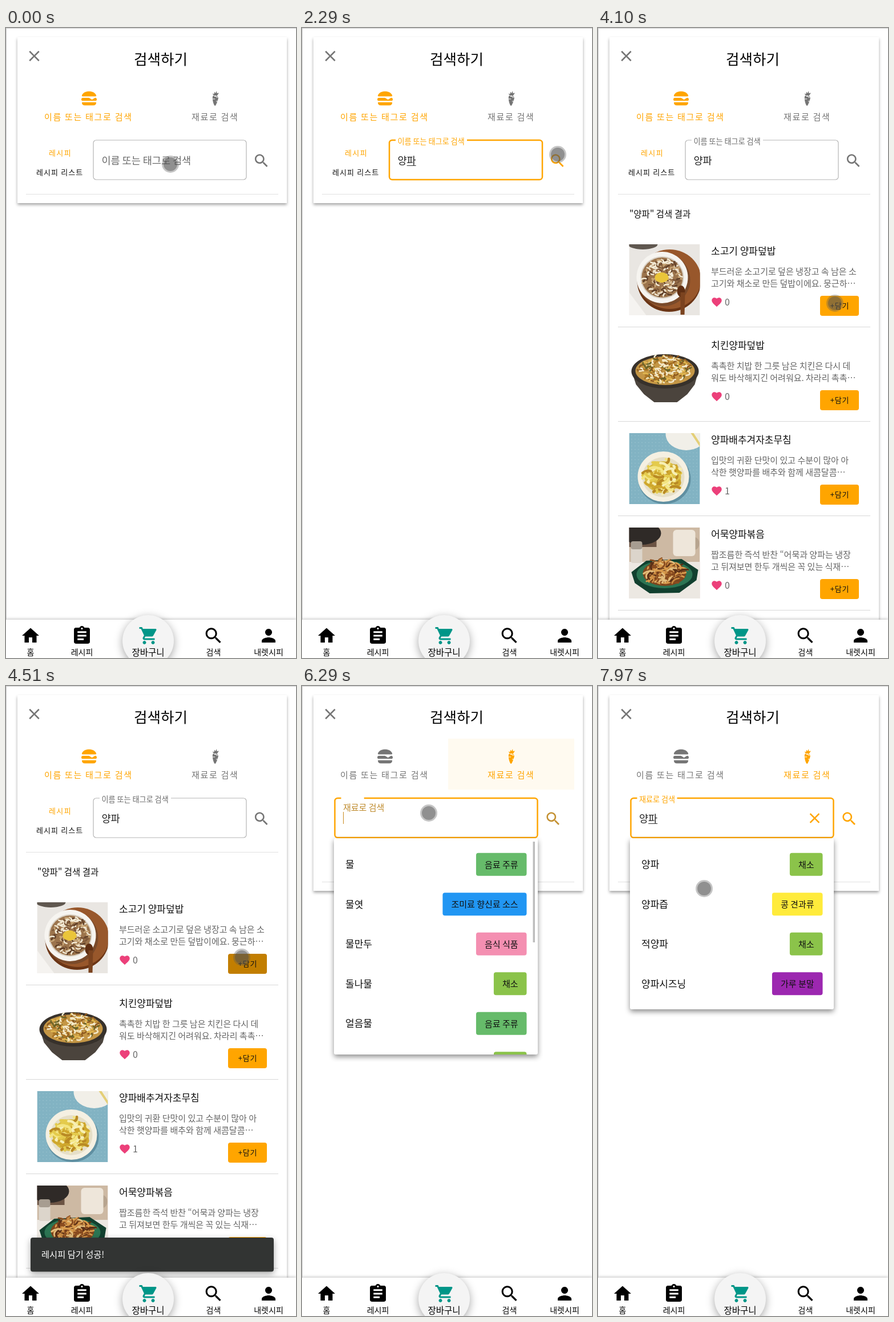
These frames come from a looping animation (508 by 1101 pixels, 8000 ms). An HTML page with a canvas:

```html
<!DOCTYPE html>
<html lang="ko">
<head>
<meta charset="utf-8">
<style>
html, body { margin: 0; width: 100%; height: 100%; overflow: hidden; background: #fff; }
canvas { display: block; }
</style>
</head>
<body>
<canvas id="stage" width="508" height="1101"></canvas>
<script>
const ctx = document.getElementById('stage').getContext('2d');
const LOOP = 8000, ORANGE = [255, 165, 0], GREY = [117, 117, 117], TAU = Math.PI * 2;
const OPEN_RESULTS = 2570, SWITCH_TAB = 5500, FOCUS_2 = 6234;

const ICONS = {
  close: 'M19 6.41L17.59 5 12 10.59 6.41 5 5 6.41 10.59 12 5 17.59 6.41 19 12 13.41 17.59 19 19 17.59 13.41 12z',
  search: 'M15.5 14h-.79l-.28-.27C15.41 12.59 16 11.11 16 9.5 16 5.91 13.09 3 9.5 3S3 5.91 3 9.5 5.91 16 9.5 16c1.61 0 3.09-.59 4.23-1.57l.27.28v.79l5 4.99L20.49 19l-4.99-5zm-6 0C7.01 14 5 11.99 5 9.5S7.01 5 9.5 5 14 7.01 14 9.5 11.99 14 9.5 14z',
  heart: 'M12 21.35l-1.45-1.32C5.4 15.36 2 12.28 2 8.5 2 5.42 4.42 3 7.5 3c1.74 0 3.41.81 4.5 2.09C13.09 3.81 14.76 3 16.5 3 19.58 3 22 5.42 22 8.5c0 3.78-3.4 6.86-8.55 11.54L12 21.35z',
  home: 'M10 20v-6h4v6h5v-8h3L12 3 2 12h3v8z',
  recipe: 'M19 3h-4.18C14.4 1.84 13.3 1 12 1c-1.3 0-2.4.84-2.82 2H5c-1.1 0-2 .9-2 2v14c0 1.1.9 2 2 2h14c1.1 0 2-.9 2-2V5c0-1.1-.9-2-2-2zm-7 0c.55 0 1 .45 1 1s-.45 1-1 1-1-.45-1-1 .45-1 1-1zm2 14H7v-2h7v2zm3-4H7v-2h10v2zm0-4H7V7h10v2z',
  cart: 'M7 18c-1.1 0-1.99.9-1.99 2S5.9 22 7 22s2-.9 2-2-.9-2-2-2zM1 2v2h2l3.6 7.59-1.35 2.45c-.16.28-.25.61-.25.96 0 1.1.9 2 2 2h12v-2H7.42c-.14 0-.25-.11-.25-.25l.03-.12.9-1.63h7.45c.75 0 1.41-.41 1.75-1.03l3.58-6.49c.08-.14.12-.31.12-.48 0-.55-.45-1-1-1H5.21l-.94-2H1zm16 16c-1.1 0-1.99.9-1.99 2s.89 2 1.99 2 2-.9 2-2-.9-2-2-2z',
  person: 'M12 12c2.21 0 4-1.79 4-4s-1.79-4-4-4-4 1.79-4 4 1.79 4 4 4zm0 2c-2.67 0-8 1.34-8 4v2h16v-2c0-2.66-5.33-4-8-4z',
  burger: 'M1 8.6C-.2 8.6-.6 7.7-.1 6.7 1.6 2.5 6 0 12 0s10.4 2.5 12.1 6.7c.5 1 .1 1.9-1.1 1.9zM1.5 11H12l5 3.2L22 11h.5a2.6 2.6 0 0 1 0 5.2h-21a2.6 2.6 0 0 1 0-5.2zM.6 18.6h22.8q.8 0 .8.8a5 5 0 0 1-5 4.6H4.8a5 5 0 0 1-5-4.6q0-.8.8-.8z',
  carrot: 'M7 9C6 14 9 24.5 11 25S16.5 14 17 11 8 5 7 9zM10.5 9L6.5 3.5 9.5 4.5 10 .5 12 3 14-1 14.5 3 18 2.5 13.5 9z'
};
for (const name in ICONS) ICONS[name] = new Path2D(ICONS[name]);

const RECIPES = [
  ['소고기 양파덮밥', '부드러운 소고기로 덮은 냉장고 속 남은 소', '고기와 채소로 만든 덮밥이에요. 뭉근하⋯', 0],
  ['치킨양파덮밥', '촉촉한 치밥 한 그릇 남은 치킨은 다시 데', '워도 바삭해지긴 어려워요. 차라리 촉촉⋯', 0],
  ['양파배추겨자초무침', '입맛의 귀환 단맛이 있고 수분이 많아 아', '삭한 햇양파를 배추와 함께 새콤달콤⋯', 1],
  ['어묵양파볶음', '짭조름한 즉석 반찬 “어묵과 양파는 냉장', '고 뒤져보면 한두 개씩은 꼭 있는 식재⋯', 0]
];
const DRINK = ['음료 주류', '#66bb6a'], VEG = ['채소', '#8bc34a'];
const WATER_LIST = [['물', ...DRINK], ['물엿', '조미료 향신료 소스', '#2196f3'], ['물만두', '음식 식품', '#f48fb1'],
  ['돌나물', ...VEG], ['얼음물', ...DRINK], ['나물', ...VEG]];
const ONION_LIST = [['양파', ...VEG], ['양파즙', '콩 견과류', '#ffeb3b'], ['적양파', ...VEG], ['양파시즈닝', '가루 분말', '#9c27b0']];

// Touch strokes: [time, x, y] points; the touch shows only within a stroke.
const TOUCHES = [
  [[0, 288, 238], [350, 288, 238]],
  [[1730, 345, 258], [2180, 448, 221], [2400, 448, 221], [2500, 446, 250], [2640, 370, 285], [2710, 342, 262], [2800, 388, 175],
   [3050, 489, 346], [3200, 455, 455], [3340, 419, 502], [3500, 419, 502], [3600, 415, 481], [4100, 415, 481], [4170, 413, 474],
   [4580, 413, 474], [4770, 400, 236], [4910, 400, 236], [5150, 357, 132], [5750, 357, 132], [6150, 222, 222], [6420, 222, 222]],
  [[7810, 222, 223], [7960, 186, 354], [8000, 186, 354]]
];

const ramp = (t, start, length) => Math.min(1, Math.max(0, (t - start) / length));
const easeOut = p => 1 - (1 - p) ** 3;
const smooth = p => p * p * (3 - 2 * p);
const mix = (a, b, p) => `rgb(${a.map((v, i) => Math.round(v + (b[i] - v) * p))})`;

function text(s, x, y, size, color = '#222', { align = 'left', weight = 300, gap = 0 } = {}) {
  ctx.font = `${weight} ${size}px "Noto Sans CJK KR", "Noto Sans CJK", "Noto Sans KR", sans-serif`;
  ctx.letterSpacing = gap + 'px';
  ctx.textAlign = align;
  ctx.textBaseline = 'middle';
  ctx.fillStyle = color;
  ctx.fillText(s, x, y);
  return ctx.measureText(s).width;
}
function rect(x, y, w, h, color, radius = 0) {
  ctx.fillStyle = color;
  ctx.beginPath();
  ctx.roundRect(x, y, w, h, radius);
  ctx.fill();
}
function oval(x, y, rx, ry, color) {
  ctx.fillStyle = color;
  ctx.beginPath();
  ctx.ellipse(x, y, rx, ry, 0, 0, TAU);
  ctx.fill();
}
function poly(color, ...points) {
  ctx.fillStyle = color;
  ctx.beginPath();
  for (let i = 0; i < points.length; i += 2) ctx.lineTo(points[i], points[i + 1]);
  ctx.fill();
}
function icon(name, x, y, scale, color) {
  ctx.save();
  ctx.translate(x - 12 * scale, y - 12 * scale);
  ctx.scale(scale, scale);
  ctx.fillStyle = color;
  ctx.fill(ICONS[name]);
  ctx.restore();
}
function scoped(draw) { ctx.save(); draw(); ctx.restore(); }
function shadowed(blur, dy, alpha, draw) {
  scoped(() => {
    ctx.shadowColor = `rgba(0,0,0,${alpha})`;
    ctx.shadowBlur = blur;
    ctx.shadowOffsetY = dy;
    draw();
  });
}
function clipped(x, y, w, h, draw) {
  scoped(() => { ctx.beginPath(); ctx.rect(x, y, w, h); ctx.clip(); draw(); });
}

// Seeded curved strokes scattered in an ellipse, as food texture.
function garnish(x, y, rx, ry, colors, seed, { count = 110, length = 8, width = 2.5 } = {}) {
  const random = () => (seed = seed * 16807 % 2147483647) / 2147483647;
  random();
  ctx.lineWidth = width;
  ctx.lineCap = 'round';
  for (let i = 0; i < count; i++) {
    const a = random() * TAU, r = Math.sqrt(random()), turn = random() * TAU;
    const px = x + rx * r * Math.cos(a), py = y + ry * r * Math.sin(a);
    const dx = length * Math.cos(turn) / 2, dy = length * Math.sin(turn) / 3;
    ctx.strokeStyle = colors[i % colors.length];
    ctx.beginPath();
    ctx.moveTo(px - dx, py - dy);
    ctx.quadraticCurveTo(px + dy, py - dx / 2, px + dx, py + dy);
    ctx.stroke();
  }
}
const PHOTOS = [
  () => {
    rect(0, 0, 124, 124, '#e9e6e2');
    oval(24, 0, 26, 9, '#5f574f');
    poly('#f5f3f0', 0, 84, 30, 124, 0, 124);
    oval(70, 64, 56, 54, '#6b3515');
    oval(71, 61, 55, 52, '#98572b');
    oval(61, 62, 46, 46, '#7a4a2a');
    oval(58, 58, 45, 45, '#f6f4f0');
    oval(58, 58, 38, 37, '#d8d0c4');
    oval(58, 58, 36, 35, '#9c744c');
    garnish(58, 58, 33, 32, ['#efe4cd', '#5f3f28', '#f4ecd8', '#7d5738', '#c8a677'], 7, { count: 150 });
    oval(57, 58, 12, 9, '#eac53a');
    oval(91, 82, 7, 10, '#5f2f13');
    poly('#7b431f', 90, 84, 98, 84, 97, 123, 90, 123);
  },
  () => {
    rect(0, 0, 124, 124, '#fff');
    poly('#4b443d', 5, 58, 12, 80, 26, 97, 44, 111, 84, 111, 102, 97, 115, 80, 121, 58);
    oval(63, 57, 59, 30, '#37312b');
    oval(63, 56, 52, 25, '#c49645');
    garnish(63, 53, 45, 24, ['#f3e6bd', '#8f5a20', '#e2b850', '#f5ecd0', '#a97424', '#6b6428'], 19, { count: 170 });
  },
  () => {
    rect(0, 0, 124, 124, '#82b3c3');
    for (let x = 4; x < 124; x += 6) for (let y = 4; y < 124; y += 6) rect(x, y, 1, 1, '#a7cdd7');
    oval(100, 2, 36, 28, '#f1efe8');
    poly('#e4cf77', 108, 0, 113, 0, 124, 17, 124, 24);
    oval(62, 80, 46, 44, '#5f8fa1');
    oval(60, 76, 45, 44, '#f5f0e2');
    oval(60, 77, 37, 35, '#e6dfc8');
    oval(59, 77, 32, 28, '#d9bd45');
    garnish(59, 76, 31, 28, ['#f3e583', '#cfa72c', '#f7efb4', '#e4cb4c', '#b98a24'], 31, { length: 15, width: 4.5, count: 90 });
  },
  () => {
    rect(0, 0, 124, 124, '#cdb9a3');
    rect(0, 0, 48, 34, '#6c5444');
    oval(22, 10, 34, 20, '#2f2a27');
    rect(0, 60, 124, 64, '#ece8e2');
    rect(3, 34, 20, 28, '#dcd5cb', 4);
    rect(3, 24, 20, 14, '#a79d91', 4);
    oval(115, 28, 8, 11, '#b7a48f');
    rect(77, 4, 39, 46, '#eee6da', 6);
    poly('#12402f', 4, 78, 30, 58, 92, 55, 121, 74, 118, 92, 88, 114, 36, 115, 10, 97);
    oval(62, 82, 49, 24, '#2c7553');
    oval(62, 80, 38, 22, '#7f451d');
    garnish(62, 77, 34, 20, ['#c98a42', '#5a2f16', '#d99c4d', '#8a4c20', '#e3bd7c'], 43, { length: 17, width: 2.8 });
  }
];

// Text being composed at time t, with the time of the last key.
function typed(t, focusTime, times) {
  const steps = ['ㅇ', '야', '양', '양ㅍ', '양파'];
  const count = times.filter(k => k <= t).length;
  return { value: count ? steps[count - 1] : '', count, last: count ? times[count - 1] : focusTime };
}

function field({ x, w, label, labelWidth, shrink, focused, tint, value, composing, caret }) {
  const color = mix([105, 105, 105], ORANGE, tint), gap = labelWidth * shrink;
  const left = x, right = x + w, top = 196, bottom = 265, r = 5;
  ctx.strokeStyle = focused ? '#ffa500' : '#b5b5b5';
  ctx.lineWidth = focused ? 2.5 : 1.2;
  ctx.lineCap = 'butt';
  ctx.beginPath();
  ctx.moveTo(left + 11 + gap, top);
  ctx.arcTo(right, top, right, bottom, r);
  ctx.arcTo(right, bottom, left, bottom, r);
  ctx.arcTo(left, bottom, left, top, r);
  ctx.arcTo(left, top, right, top, r);
  ctx.lineTo(left + 11, top);
  ctx.stroke();
  text(label, x + 14.5, 231 - 33 * shrink, 17.5 - 4.4 * shrink, color);
  const width = value ? text(value, x + 14.5, 231, 17.5) : 0;
  if (composing && value) rect(x + 14.5 + width - 16, 240, 16, 1, '#333');
  if (caret) rect(x + 14.5 + width, 220, 1, 21, tint > .3 ? '#c98a20' : '#333');
}

function drawNamePanel(t) {
  const cleared = t >= SWITCH_TAB, focused = t >= 130 && t < 2500;
  const input = typed(t, 240, [1000, 1050, 1100, 1200, 1340]);
  const tint = t < 2500 ? ramp(t, 130, 200) : 1 - ramp(t, 2500, 200);
  text('레시피', 75, 218, 13, '#ffa500', { gap: 1.4 });
  text('레시피 리스트', 53, 252, 13, '#111', { gap: 1.1 });
  field({
    x: 153, w: 268, label: '이름 또는 태그로 검색', labelWidth: 125, focused, tint,
    shrink: cleared ? 1 - easeOut(ramp(t, SWITCH_TAB, 230)) : easeOut(ramp(t, 130, 230)),
    value: cleared ? '' : input.value, composing: focused,
    caret: focused && t > 240 && (t - input.last) % 1000 < 500
  });
  const ripple = ramp(t, 2420, 120) * (1 - ramp(t, 3080, 220));
  if (ripple) oval(447, 233, 19, 19, `rgba(0,50,40,${.07 * ripple})`);
  icon('search', 447.5, 232, 1.29, mix(GREY, ORANGE, tint));
  rect(35, 290, 442, 1, '#e0e0e0');
}

function drawIngredientPanel(t) {
  const focused = t >= FOCUS_2, tint = easeOut(ramp(t, FOCUS_2, 230));
  const input = typed(t, 6260, [6960, 7070, 7180, 7300, 7410]);
  field({
    x: 57.5, w: 355, label: '재료로 검색', labelWidth: 70, focused, tint, shrink: tint,
    value: input.value, composing: true,
    caret: focused && (t - input.last) % 1000 < 500
  });
  if (input.count) icon('close', 379.5, 231, 1.25, '#ffa500');
  icon('search', 440, 232, 1.29, mix(GREY, ORANGE, tint));
  rect(35, 342, 442, 1, '#e0e0e0');
}

function drawResults(t) {
  text('"양파" 검색 결과', 55, 325, 15.5, '#111');
  RECIPES.forEach(([title, line1, line2, likes], i) => {
    const y = 165 * i;
    scoped(() => {
      ctx.translate(54.5, 378 + y);
      clipped(0, 0, 124, 124, PHOTOS[i]);
    });
    text(title, 198, 390 + y, 17, '#111');
    text(line1, 198, 425 + y, 15, '#666');
    text(line2, 198, 446 + y, 15, '#666');
    icon('heart', 208, 479 + y, .87, '#ec407a');
    text(likes, 222, 479 + y, 16, '#666');
    rect(389, 468 + y, 68, 35, '#ffa500', 4);
    const press = i ? 0 : ramp(t, 4170, 150) * (1 - ramp(t, 4580, 160));
    if (press) rect(389, 468 + y, 68, 35, `rgba(0,0,0,${.24 * press})`, 4);
    text('+담기', 423.5, 485 + y, 13, '#111', { align: 'center', gap: .8 });
    rect(35, 522 + y, 442, 1, '#d8d8d8');
  });
}

function drawTabs(t) {
  const p = smooth(ramp(t, SWITCH_TAB - 45, 250)), second = t >= SWITCH_TAB;
  const glow = ramp(t, SWITCH_TAB - 60, 90) * (1 - ramp(t, 6300, 180));
  if (glow) rect(256, 92, 221, 89, `rgba(255,165,0,${.06 * glow})`);
  icon('burger', 145.5, 123, 1.03, mix(ORANGE, GREY, p));
  icon('carrot', 367, 123, 1, mix(GREY, ORANGE, p));
  ctx.strokeStyle = '#fff';
  ctx.lineWidth = 1;
  ctx.beginPath();
  for (const [x, y] of [[362, 124], [368, 121], [368, 128]]) { ctx.moveTo(x, y); ctx.lineTo(x + 4, y); }
  ctx.stroke();
  text('이름 또는 태그로 검색', 67, 155, 15, second ? '#757575' : '#ffa500', { gap: 1.7 });
  text('재료로 검색', 325, 155, 15, second ? '#ffa500' : '#757575', { gap: 1.7 });
}

function drawDropdown(t) {
  const onion = t >= 7180, bottom = onion ? 565 : 644;
  shadowed(10, 4, .45, () => rect(56, 266, 357, bottom - 266, '#fff', 3));
  clipped(56, 266, 357, bottom - 266, () => {
    (onion ? ONION_LIST : WATER_LIST).forEach(([name, tag, color], i) => {
      const y = 311.8 + 69.5 * i;
      text(name, 76, y, 17, '#111');
      const w = text(tag, -200, y, 15) + 30;
      rect(393.5 - w, y - 20, w, 40, color, 4);
      text(tag, 378.5, y, 15, '#111', { align: 'right' });
    });
    if (!onion) rect(404.5, 272, 3.5, 176, '#bdbdbd');
  });
}

function drawSnackbar(t) {
  const show = easeOut(ramp(t, 4230, 225)) * (1 - smooth(ramp(t, 5960, 200)));
  if (!show) return;
  scoped(() => {
    const s = .75 + .25 * show;
    ctx.globalAlpha = show;
    ctx.translate(256, 994);
    ctx.scale(s, s);
    ctx.translate(-256, -994);
    shadowed(12, 4, .35, () => rect(43, 964, 426, 59.5, '#323433', 4));
    text('레시피 담기 성공!', 62, 993.5, 15.3, '#fff', { weight: 500 });
  });
}

function drawNav() {
  shadowed(5, -1, .25, () => rect(0, 1034, 508, 70, '#fff'));
  shadowed(15, 4, .35, () => oval(249, 1071, 45, 45, '#f4f4f4'));
  [['home', '홈', 43, 1.5], ['recipe', '레시피', 133, 1.55], ['cart', '장바구니', 249, 1.5],
   ['search', '검색', 363.5, 1.54], ['person', '내렛시피', 460, 1.5]].forEach(([name, label, x, scale]) => {
    const cart = name === 'cart';
    icon(name, x + (cart ? 1 : 0), 1062, scale, cart ? '#009688' : '#000');
    text(label, x, 1091, cart ? 15.5 : 14, '#000', { align: 'center' });
  });
}

function drawTouch(t) {
  const path = TOUCHES.find(p => t >= p[0][0] && t < p[p.length - 1][0]);
  if (!path) return;
  const i = path.findIndex(k => k[0] > t) - 1, [t0, x0, y0] = path[i], [t1, x1, y1] = path[i + 1];
  const p = smooth((t - t0) / (t1 - t0)), x = x0 + (x1 - x0) * p, y = y0 + (y1 - y0) * p;
  scoped(() => {
    ctx.globalAlpha = path === TOUCHES[0] ? 1 - ramp(t, 130, 220) : 1;
    oval(x, y, 15, 15, 'rgba(90,90,90,.35)');
    oval(x, y, 12, 12, 'rgba(80,80,80,.45)');
  });
}

function draw(t) {
  const slide = easeOut(ramp(t, SWITCH_TAB, 350));
  const results = t >= OPEN_RESULTS && t < SWITCH_TAB;
  const bottom = results ? 1110 : 306 + 52 * slide;
  rect(0, 0, 508, 1101, '#fff');
  rect(0, 0, 508, 1, '#ccc');
  rect(0, 0, 1, 1101, '#ccc');
  shadowed(5, 3, .35, () => rect(20, 16, 472, bottom - 16, '#fff'));
  icon('close', 49.5, 49, 1.31, '#757575');
  text('검색하기', 271, 54, 25.5, '#000', { align: 'center' });
  drawTabs(t);
  clipped(35, 181, 442, bottom - 181, () => {
    ctx.translate(-442 * slide, 0);
    if (slide < 1) drawNamePanel(t);
    if (results) drawResults(t);
    ctx.translate(442, 0);
    if (slide > 0) drawIngredientPanel(t);
  });
  if (t >= FOCUS_2) drawDropdown(t);
  drawSnackbar(t);
  drawNav();
  drawTouch(t);
}

const start = performance.now();
function tick() {
  draw((performance.now() - start) % LOOP);
  requestAnimationFrame(tick);
}
tick();
</script>
</body>
</html>
```
